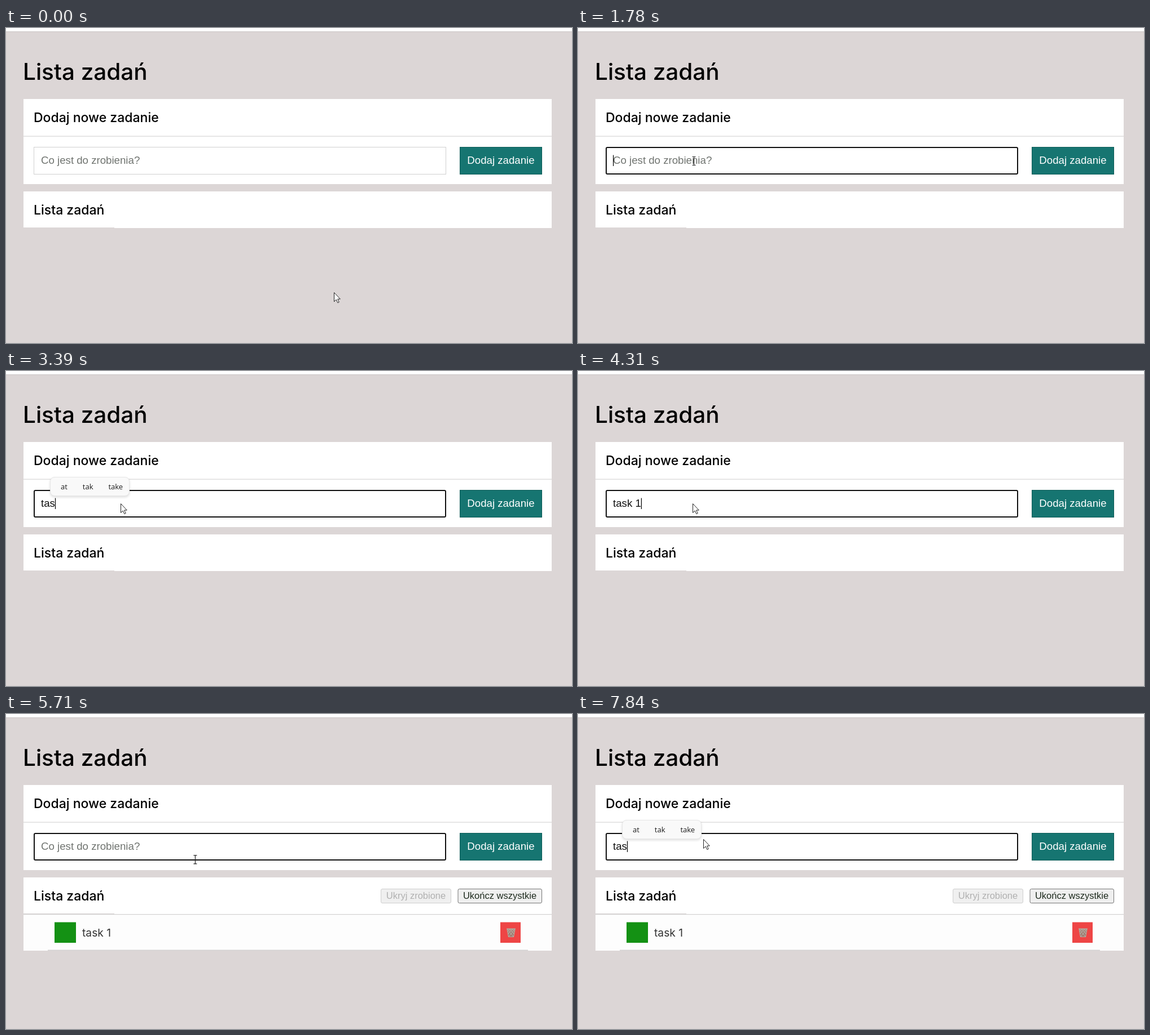
These frames come from a looping animation (1003 px wide and 559 px high, 8 s). An HTML page:

```html
<!DOCTYPE html>
<html lang="pl">
<meta charset="utf-8">
<title>Lista zadań</title>
<style>
  html, body { margin: 0; width: 100%; height: 100%; overflow: hidden; background: #dcd6d6; }
  svg { display: block; }
  text { white-space: pre; }
  .head { font: 500 23px Inter, sans-serif; font-optical-sizing: none; }
  .field { font: 18.67px "Liberation Sans", Arial, sans-serif; }
  .small { font: 16.5px "Liberation Sans", Arial, sans-serif; text-anchor: middle; }
  #popup {
    position: absolute; top: 8px; height: 34px; box-sizing: border-box;
    display: flex; gap: 27px; align-items: center; padding: 0 11px 0 18px;
    background: #f9f9f9; border: 1px solid #e6e6e6; border-radius: 8px;
    box-shadow: 0 2px 4px #0002; font: 13px "Open Sans", sans-serif; color: #1c1c1c;
  }
</style>
<svg width="1003" height="559" viewBox="0 0 1003 559">
  <path fill="#fff" d="M0 0H1003V6H0z"/>
  <path fill="#c9c5c5" d="M0 6H1003V7H0z"/>
  <text class="head" x="30" y="92" style="font-size:40.5px">Lista zadań</text>

  <path fill="#fff" d="M31 126H967V277H31zM31 290H967V355H192V354H31z"/>
  <path fill="#d9d7d7" d="M31 191.5H967V192.7H31z"/>
  <text class="head" x="49" y="167">Dodaj nowe zadanie</text>
  <text class="head" x="49" y="331">Lista zadań</text>

  <rect id="box" fill="#fff"/>
  <rect x="804.5" y="211.5" width="145" height="48" fill="#167571" stroke="#0d5c58"/>
  <text class="field" x="877" y="241" fill="#fff" text-anchor="middle">Dodaj zadanie</text>
  <text class="field" id="hint" x="62" y="241" fill="#6f736f">Co jest do zrobienia?</text>
  <text class="field" id="typed" x="62" y="241" fill="#111"></text>
  <path id="caret" fill="#000" d="M0 225.5h1.2v19.5h-1.2z"/>

  <g id="task">
    <path fill="#fdfdfd" d="M31 356H967V420H31z"/>
    <path fill="#d4d2d2" d="M31 354.5H192V355H967V356.3H31zM74 418.5H925V420H74z"/>
    <rect x="664.5" y="310.5" width="124" height="25" rx="2.5" fill="#efefef" stroke="#cfcfcf"/>
    <text class="small" x="726.5" y="328" fill="#b0b0b0">Ukryj zrobione</text>
    <rect x="801" y="310.5" width="148.5" height="25" rx="2.5" fill="#efefef" stroke="#767676"/>
    <text class="small" x="875" y="328" fill="#1d2a1d">Ukończ wszystkie</text>
    <path fill="#149114" d="M86 369.5H124V406H86z"/>
    <text class="head" x="135" y="395" fill="#333" style="font-size:19.2px;font-weight:400">task 1</text>
    <path fill="#ee4545" d="M876 369.5H912V406H876z"/>
    <g fill="none" stroke="#b3aca0" stroke-width="1.2">
      <path fill="#a0786f" d="M888 381.5H902L899.5 395.5H890.5z"/>
      <path d="M887 381H903M889 382L899 395M893 382L900 390M897 382L901 386M901 382L891 395M897 382L890 390M893 382L889 386"/>
    </g>
  </g>

  <foreignObject y="180" width="320" height="60"><div id="popup"></div></foreignObject>
  <g id="pointer">
    <path id="arrow" fill="#fff" stroke="#222" d="M.5.5V16.5L4.2 13L6.8 18.6L9.2 17.5L6.7 12H11.3z"/>
    <path id="beam" fill="none" stroke="#222" stroke-width="1.2" d="M-.5-6.5H2L2.5-6L3-6.5H5.5M2.5-6V8M-.5 8.5H2L2.5 8L3 8.5H5.5"/>
  </g>
</svg>
<script>
const LOOP = 8000, FRAME = 70;
const $ = id => document.getElementById(id);
const [box, hint, typed, caret, task, popup, pointer, arrow, beam] =
  ["box", "hint", "typed", "caret", "task", "popup", "pointer", "arrow", "beam"].map($);

// [time, text]
const typing = [[0, ""], [2790, "t"], [2990, "ta"], [3390, "tas"], [3580, "task"], [3920, "task "],
  [4110, "task 1"], [4580, ""], [7450, "t"], [7650, "ta"], [7840, "tas"]];
// [time, words, left]
const popups = [[0, ""], [3060, "tak take taka", 78], [3190, "at tak take", 78], [3650, "task take taki", 87],
  [3970, ""], [4170, "na do dni", 112], [4310, ""], [7700, "tak take taka", 78], [7840, "at tak take", 78]];
// times at which the caret switches on or off
const blinks = [1640, 2240, 2720, 4640, 5160, 5700, 6230, 6760, 7310];
// [time, x, y]
const path = [[0, 581, 469], [70, 581, 469], [140, 587, 444], [400, 460, 372], [620, 265, 285], [820, 222, 222],
  [890, 222, 222], [1120, 206, 212], [1440, 203, 235], [5420, 203, 235], [5560, 300, 255], [5640, 350, 262],
  [5780, 270, 240], [5920, 219, 220], [6180, 219, 220], [6250, 220, 221], [6650, 220, 221], [6770, 222, 222]];

const latest = (track, t) => track.findLast(k => k[0] <= t);
const show = (el, on) => el.style.display = on ? "" : "none";

function place(t) {
  t = Math.floor(t / FRAME) * FRAME;
  const i = path.findIndex(k => k[0] > t);
  if (i < 0) return path.at(-1).slice(1);
  const [t0, x0, y0] = path[i - 1], [t1, x1, y1] = path[i];
  const f = (t - t0) / (t1 - t0);
  return [x0 + (x1 - x0) * f, y0 + (y1 - y0) * f];
}

function setBox(inset, width, colour, radius) {
  const attrs = { x: 49 + inset, y: 211 + inset, width: 731 - 2 * inset, height: 49 - 2 * inset,
    rx: radius, stroke: colour, "stroke-width": width };
  for (const name in attrs) box.setAttribute(name, attrs[name]);
}

function draw(t) {
  if (t >= 1640) setBox(1, 2, "#101010", 2);
  else setBox(.5, 1, "#d0d0d0", 0);

  const text = latest(typing, t)[1];
  typed.textContent = text;
  show(hint, !text);
  show(task, t >= 4580);
  show(caret, blinks.filter(b => b <= t).length % 2);
  const end = text ? typed.getComputedTextLength() : 0;
  caret.setAttribute("transform", `translate(${62 + end})`);

  const [, words, left] = latest(popups, t);
  show(popup, words);
  popup.innerHTML = words.split(" ").map(w => `<span>${w}</span>`).join("");
  popup.style.left = left + "px";

  const [x, y] = place(t);
  const suggesting = t >= 3060 && t < 5200 || t >= 7700;
  const inField = x > 49 && x < 780 && y > 210 && y < 260;
  show(arrow, suggesting || !inField);
  show(beam, !suggesting && inField);
  pointer.setAttribute("transform", `translate(${x} ${y})`);
}

function tick() {
  draw(performance.now() % LOOP);
  requestAnimationFrame(tick);
}
tick();
</script>
</html>
```
